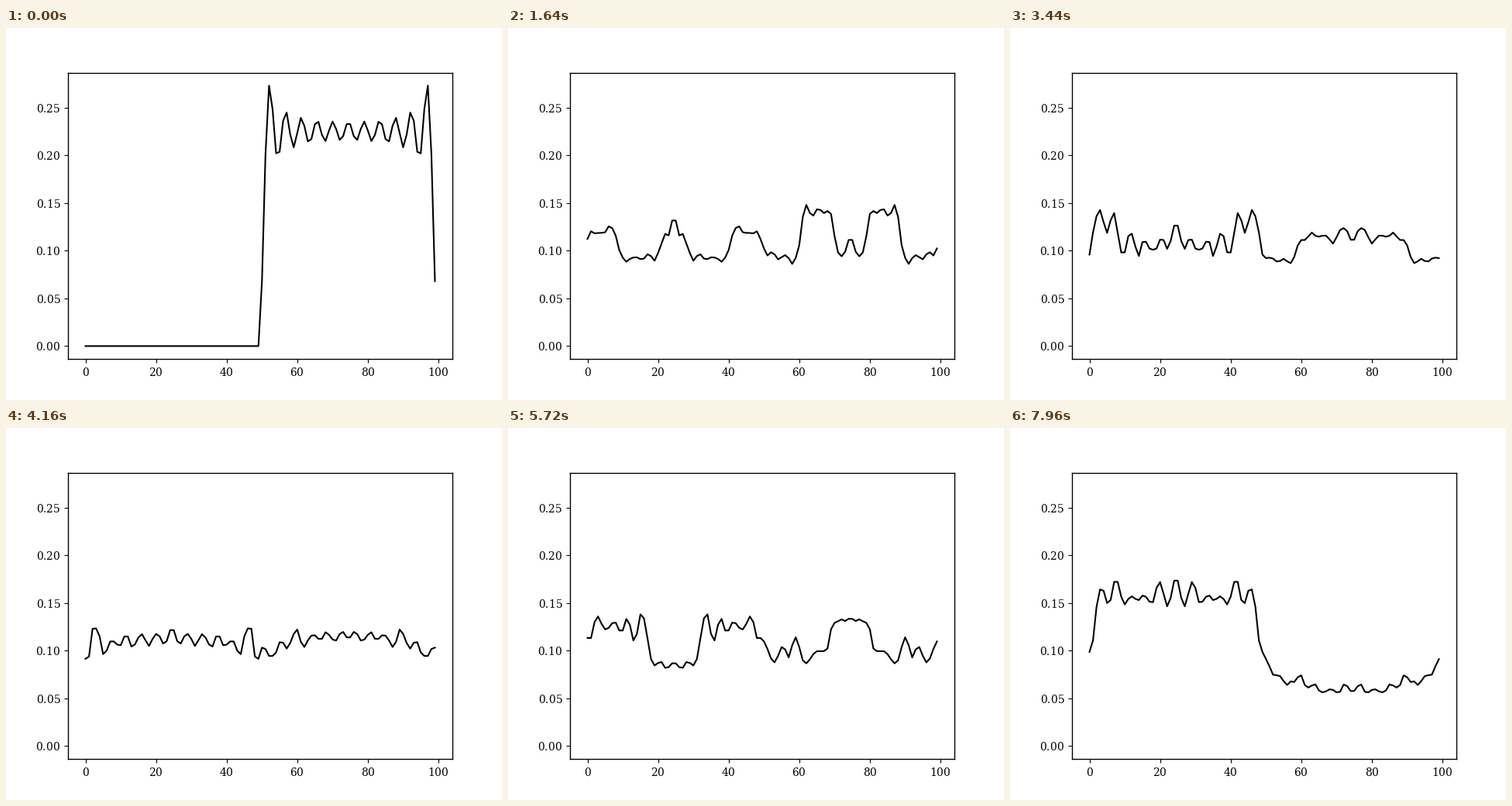
Recreate the animation shown at these times as a matplotlib script. Size 640 by 480 pixels, loop 8 s.

```python
import numpy as np
import matplotlib.pyplot as plt
from matplotlib.animation import FuncAnimation

plt.rcParams.update({
    "font.family": "DejaVu Serif",
    "axes.linewidth": 1.0,
    "axes.formatter.use_mathtext": True,
})

SITES = 100       # ring length
HALF = SITES // 2
PARTICLES = 11
FRAMES = 200
INTERVAL = 40     # ms
DT = 1000 / 249   # evolution time per frame, in units of 1/hopping

# Lowest standing waves of a box covering the right half of the ring
box = np.arange(1, HALF + 1)
level = np.arange(1, PARTICLES + 1)
orbitals = np.zeros((PARTICLES, SITES))
orbitals[:, HALF:] = np.sqrt(2 / (HALF + 1)) * np.sin(
    np.pi * np.outer(level, box) / (HALF + 1))

# Free hopping on the ring is diagonal in momentum space
momenta = 2 * np.pi * np.fft.fftfreq(SITES)
energy = -2 * np.cos(momenta)
spectrum = np.fft.fft(orbitals, axis=1)


def density(t):
    psi = np.fft.ifft(spectrum * np.exp(-1j * energy * t), axis=1)
    return (np.abs(psi) ** 2).sum(axis=0)


fig, ax = plt.subplots(figsize=(6.4, 4.8), dpi=100)
line, = ax.plot(np.arange(SITES), density(0), color="black", lw=1.5)
# Keep the axis limits fitted to the initial profile
ax.set_xlim(ax.get_xlim())
ax.set_ylim(ax.get_ylim())


def update(i):
    line.set_ydata(density(i * DT))
    return line,


anim = FuncAnimation(fig, update, frames=FRAMES, interval=INTERVAL,
                     repeat=True, repeat_delay=0, blit=False)
plt.show()
```
